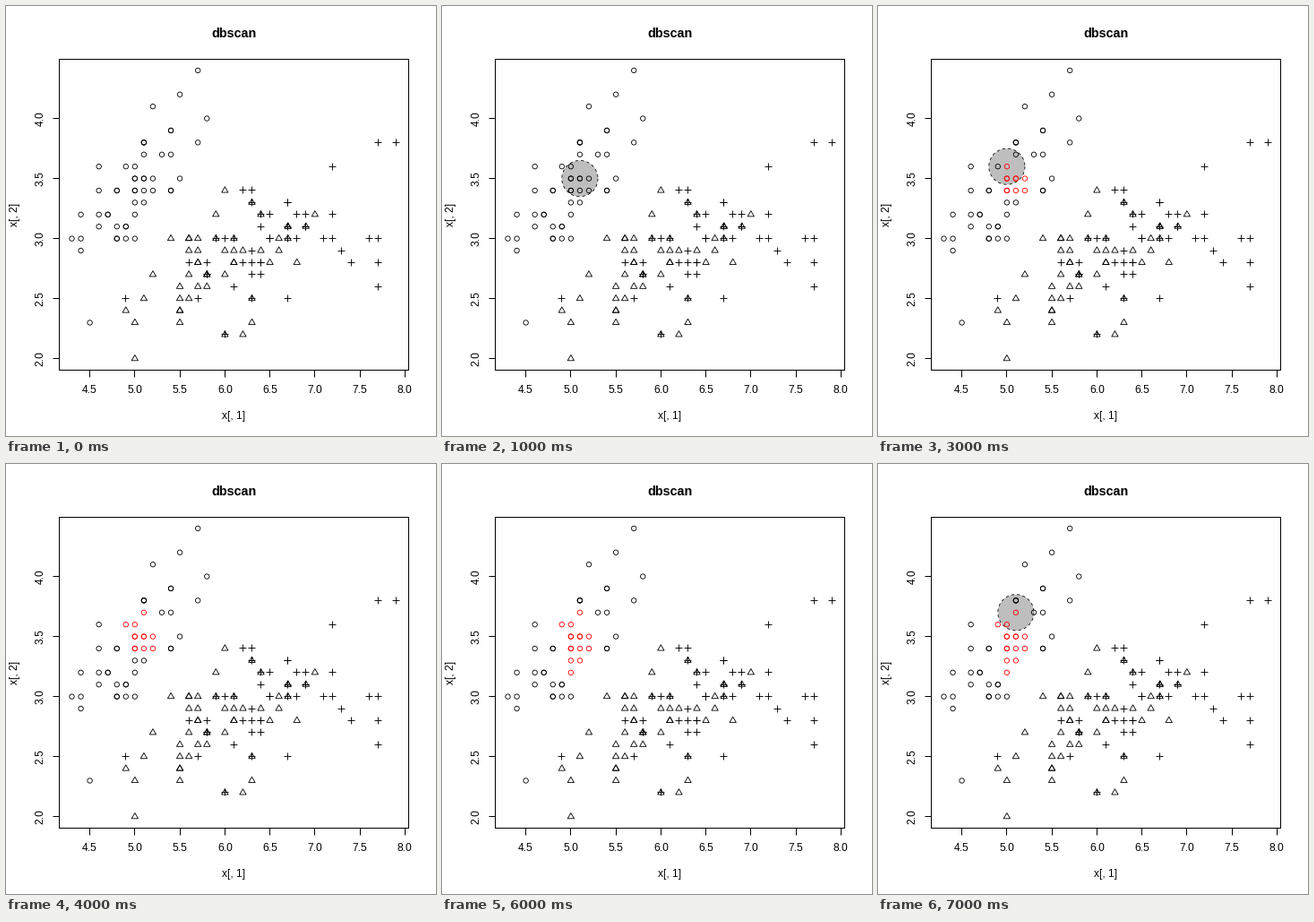
A matplotlib script for the animation above (8000 ms loop, 480 px wide and 480 px high).

```python
import numpy as np
import matplotlib.pyplot as plt
from matplotlib.animation import FuncAnimation
from matplotlib.collections import PolyCollection, LineCollection
from matplotlib.patches import Polygon, Rectangle

SIZE = 480
LINE = 14.4                      # height of one margin line
LEFT, RIGHT, TOP, BOTTOM = 59.04, 449.76, 59.04, 406.56
X_RANGE, Y_RANGE = (4.156, 8.044), (1.904, 4.496)
EPS = 0.2
MARK = 2.7                       # radius of a point marker
CENTRES = [(5.1, 3.5), (5.0, 3.6), (5.0, 3.4), (5.1, 3.7)]
DARK_STEP = 2

# Each group maps a height to the x values found there.
ROUND = {
    2.3: [4.5], 2.9: [4.4],
    3.0: [4.9, 4.8, 4.3, 5.0, 4.4, 4.8],
    3.1: [4.6, 4.9, 4.8, 4.9],
    3.2: [4.7, 4.7, 5.0, 4.4, 4.6],
    3.3: [5.1, 5.0],
    3.4: [4.6, 5.0, 4.8, 5.4, 4.8, 5.0, 5.2, 5.4, 5.1],
    3.5: [5.1, 5.1, 5.2, 5.5, 5.0, 5.0],
    3.6: [5.0, 4.6, 4.9],
    3.7: [5.4, 5.1, 5.3],
    3.8: [5.7, 5.1, 5.1, 5.1],
    3.9: [5.4, 5.4],
    4.0: [5.8], 4.1: [5.2], 4.2: [5.5], 4.4: [5.7],
}
TRIANGLE = {
    2.0: [5.0],
    2.2: [6.0, 6.2],
    2.3: [5.5, 6.3, 5.0],
    2.4: [4.9, 5.5, 5.5],
    2.5: [5.6, 6.3, 5.5, 5.1],
    2.6: [5.7, 5.5, 5.8],
    2.7: [5.2, 5.8, 5.8, 6.0, 5.6],
    2.8: [6.5, 5.7, 6.1, 6.1, 6.8, 5.7],
    2.9: [6.6, 6.1, 5.6, 6.4, 6.0, 5.7, 6.2],
    3.0: [5.9, 5.6, 6.6, 6.7, 5.4, 5.6, 6.1, 5.7],
    3.1: [6.9, 6.7, 6.7],
    3.2: [7.0, 6.4, 5.9],
    3.3: [6.3], 3.4: [6.0],
}
PLUS = {
    2.2: [6.0],
    2.5: [4.9, 6.7, 5.7, 6.3],
    2.6: [7.7, 6.1],
    2.7: [5.8, 6.4, 6.3, 5.8],
    2.8: [5.8, 5.6, 7.7, 6.2, 6.4, 7.4, 6.4, 6.3],
    2.9: [6.3, 7.3],
    3.0: [7.1, 6.5, 7.6, 6.8, 6.5, 7.2, 6.1, 7.7, 6.0, 6.7, 6.5, 5.9],
    3.1: [6.4, 6.9, 6.7, 6.9],
    3.2: [6.5, 6.4, 6.9, 7.2, 6.8],
    3.3: [6.3, 6.7, 6.7],
    3.4: [6.3, 6.2],
    3.6: [7.2],
    3.8: [7.7, 7.9],
}


def points(group):
    return [(x, y) for y, xs in group.items() for x in xs]


def px(x):
    return LEFT + (x - X_RANGE[0]) / (X_RANGE[1] - X_RANGE[0]) * (RIGHT - LEFT)


def py(y):
    return BOTTOM - (y - Y_RANGE[0]) / (Y_RANGE[1] - Y_RANGE[0]) * (BOTTOM - TOP)


def ring(x, y, radius, count=48):
    a = np.linspace(0, 2 * np.pi, count, endpoint=False)
    return np.column_stack([px(x) + radius * np.cos(a), py(y) + radius * np.sin(a)])


def triangle(x, y):
    cx, cy = px(x), py(y)
    half, base = 1.34677 * MARK, cy + 0.77756 * MARK
    return [(cx, cy - 1.55512 * MARK), (cx + half, base), (cx - half, base)]


def plus(x, y):
    cx, cy = int(px(x)), int(py(y))
    return [[(cx - 4, cy), (cx + 4, cy)], [(cx, cy - 4), (cx, cy + 4)]]


fig = plt.figure(figsize=(SIZE / 72, SIZE / 72), dpi=72)
ax = fig.add_axes([0, 0, 1, 1])
ax.set_xlim(0, SIZE)
ax.set_ylim(SIZE, 0)
ax.axis("off")

backdrop = ax.add_patch(Rectangle((-2, -2), SIZE + 4, SIZE + 4, lw=0, zorder=0))
strip = ax.add_patch(Rectangle((0, 477), SIZE, 3, fc="#43363a", lw=0, zorder=0.5))
region = ax.add_patch(Polygon(ring(*CENTRES[0], 20.1, 120), fc="#bebebe", ec="black",
                              lw=0.8, ls=(0, (4, 4)), zorder=1))

# Frame and ticks
l, r, t, b = int(LEFT), int(RIGHT), int(TOP), int(BOTTOM)
lines = [[(l, t), (r, t), (r, b), (l, b), (l, t)]]
label = dict(family="Liberation Sans", size=12, ha="center", va="baseline")
upright = dict(label, rotation=90, rotation_mode="anchor")
for v in np.arange(4.5, 8.1, 0.5):
    lines.append([(int(px(v)), b), (int(px(v)), b + 8)])
    ax.text(px(v), BOTTOM + 1.8 * LINE, f"{v:.1f}", **label)
for v in np.arange(2.0, 4.1, 0.5):
    lines.append([(l, int(py(v))), (l - 7, int(py(v)))])
    ax.text(LEFT - 1.2 * LINE, py(v), f"{v:.1f}", **upright)
ax.add_collection(LineCollection(lines, colors="black", lw=1, capstyle="butt", zorder=2))

mid_x, mid_y = (LEFT + RIGHT) / 2, (TOP + BOTTOM) / 2
ax.text(mid_x, BOTTOM + 3.8 * LINE, "x[, 1]", **label)
ax.text(LEFT - 3.2 * LINE, mid_y, "x[, 2]", **upright)
ax.text(mid_x, 34.8, "dbscan", **dict(label, size=14.4, weight="bold"))

# Data markers
round_points = points(ROUND)
rings = PolyCollection([ring(x, y, MARK) for x, y in round_points],
                       facecolors="none", edgecolors="black", lw=0.85, zorder=3)
ax.add_collection(rings)
ax.add_collection(PolyCollection([triangle(x, y) for x, y in points(TRIANGLE)],
                                 facecolors="none", edgecolors="black", lw=0.85, zorder=3))
ax.add_collection(LineCollection([s for x, y in points(PLUS) for s in plus(x, y)],
                                 colors="black", lw=0.9, zorder=3))


def reached(point, centres):
    return any(np.hypot(point[0] - x, point[1] - y) <= EPS for x, y in centres)


def draw(step):
    dark = step == DARK_STEP
    backdrop.set_facecolor("#3c3c3c" if dark else "white")
    strip.set_visible(dark)

    # Odd steps show the search region, even steps mark what it caught.
    done = CENTRES[:step // 2]
    region.set_visible(step % 2 == 1)
    region.set_xy(ring(*CENTRES[step // 2], 20.1, 120))
    hit = "#686868" if dark else "red"
    rings.set_edgecolor([hit if reached(p, done) else "black" for p in round_points])
    return backdrop, strip, region, rings


anim = FuncAnimation(fig, draw, frames=8, interval=1000, repeat=True,
                     repeat_delay=0, blit=False)
plt.show()
```
